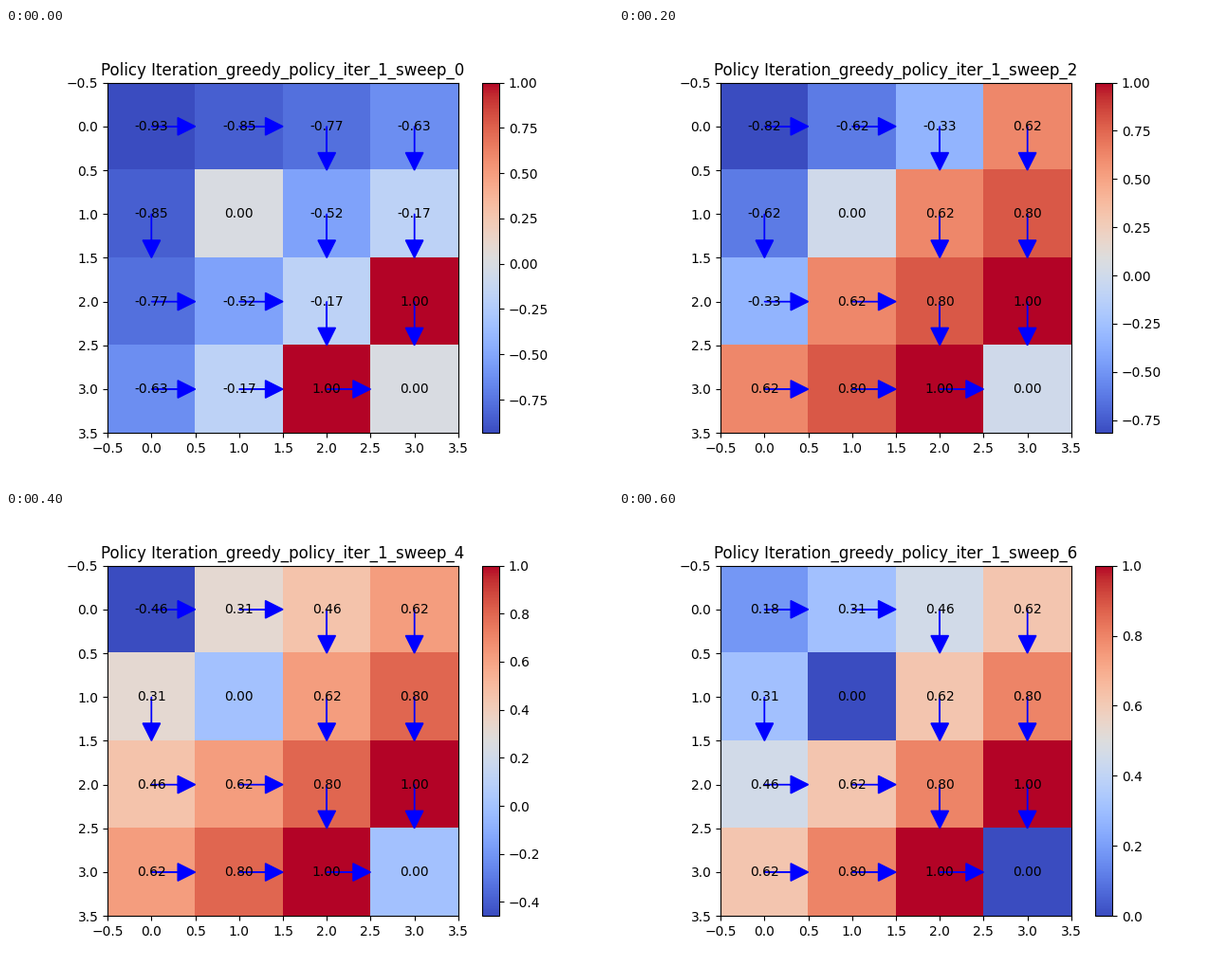
Recreate the animation shown at these times as a matplotlib script. Size 640x480 px, loop 700 ms.

```python
import matplotlib.pyplot as plt
import numpy as np
from matplotlib.animation import FuncAnimation

SIZE, SWEEPS = 4, 7
WALL, GOAL = (1, 1), (3, 3)
STEP_COST, GAMMA = -0.1, 0.9
# starting value by number of steps short of the goal's neighbours
BY_STEPS = [1.0, -0.174, -0.5248, -0.774, -0.847, -0.934]
CORNER_LOSS = 0.105
RIGHT, DOWN = (0, 1), (1, 0)

CELLS = [(r, c) for r in range(SIZE) for c in range(SIZE)]
ACTIVE = [cell for cell in CELLS if cell not in (WALL, GOAL)]


def policy(row, col):
    """Head right to the third column or along the bottom row, else down."""
    blocked = (row, col + 1) == WALL
    return RIGHT if row == SIZE - 1 or (col < 2 and not blocked) else DOWN


def start():
    values = np.zeros((SIZE, SIZE))
    for row, col in ACTIVE:
        steps = sum(GOAL) - row - col - 1
        in_corner = abs(row - col) == SIZE - 1
        values[row, col] = BY_STEPS[steps] - CORNER_LOSS * in_corner
    return values


def sweep(values):
    """One synchronous evaluation of the policy."""
    new = values.copy()
    for row, col in ACTIVE:
        dy, dx = policy(row, col)
        nxt = (row + dy, col + dx)
        new[row, col] = 1.0 if nxt == GOAL else STEP_COST + GAMMA * values[nxt]
    return new


history = [start()]
while len(history) < SWEEPS:
    history.append(sweep(history[-1]))

fig, ax = plt.subplots(figsize=(6.4, 4.8), dpi=100)
image = ax.imshow(history[0], cmap="coolwarm")
fig.colorbar(image, ax=ax)
title = ax.set_title("")
labels = {(r, c): ax.text(c, r, "", ha="center", va="center") for r, c in CELLS}
for row, col in ACTIVE:
    dy, dx = policy(row, col)
    ax.arrow(col, row, 0.3 * dx, 0.3 * dy,
             head_width=0.2, head_length=0.2, color="blue")
ax.set(xlim=(-0.5, SIZE - 0.5), ylim=(SIZE - 0.5, -0.5))


def draw(n):
    values = history[n]
    image.set_data(values)
    image.set_clim(values.min(), values.max())
    title.set_text(f"Policy Iteration_greedy_policy_iter_1_sweep_{n}")
    for cell, label in labels.items():
        label.set_text(f"{values[cell]:.2f}")


anim = FuncAnimation(fig, draw, frames=SWEEPS, interval=100,
                     init_func=lambda: draw(0), repeat=True, repeat_delay=0)
plt.show()
```
